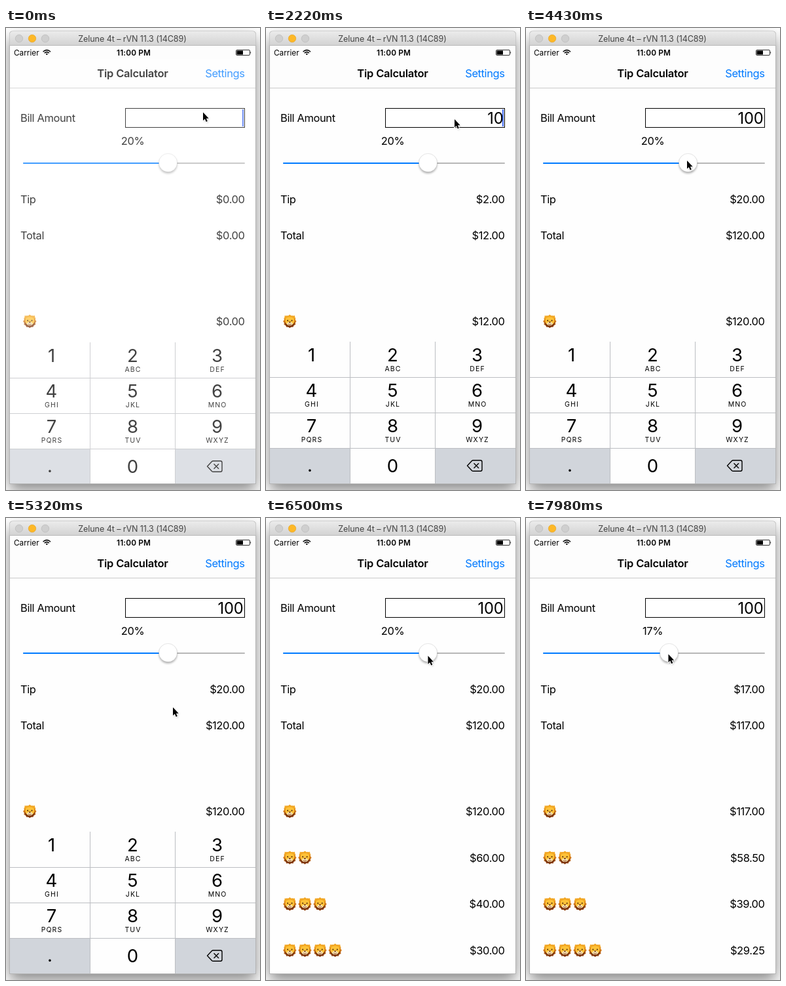
Write an HTML page that moves like this. It is 388 by 704 pixels and loops after 8 s.

```html
<!DOCTYPE html>
<html lang="en">
<head>
<meta charset="utf-8">
<title>Tip Calculator</title>
<style>
  html, body { margin: 0; width: 100%; height: 100%; overflow: hidden; background: #fff; }
  svg { display: block; }
  text { font-family: Inter, "Liberation Sans", sans-serif; font-size: 16.5px; letter-spacing: -.4px; white-space: pre; }
  .end { text-anchor: end; }
  .mid { text-anchor: middle; }
  .bar { font-size: 11.8px; letter-spacing: 0; }
  .digit { font-size: 27.5px; letter-spacing: 0; text-anchor: middle; }
  .sub { font-size: 10.5px; letter-spacing: 1.1px; text-anchor: middle; }
</style>
</head>
<body>
<svg width="388" height="704" viewBox="0 0 388 704">
  <defs>
    <linearGradient id="chrome" x2="0" y2="1">
      <stop stop-color="#ebebeb"/><stop offset="1" stop-color="#d2d2d2"/>
    </linearGradient>
    <linearGradient id="mane" x2="0" y2="1">
      <stop offset=".1" stop-color="#f0a21f"/><stop offset=".5" stop-color="#d47a18"/><stop offset="1" stop-color="#8a3c10"/>
    </linearGradient>
    <filter id="blur" x="-20%" y="-20%" width="140%" height="140%"><feGaussianBlur stdDeviation="11"/></filter>
    <filter id="soft" x="-50%" y="-50%" width="200%" height="200%"><feGaussianBlur stdDeviation="1.8"/></filter>
    <clipPath id="screen"><rect x="6" y="27" width="375" height="667"/></clipPath>
    <g id="lion">
      <path id="fur" fill="url(#mane)"/>
      <path d="M-8.500 -4L-7.500 -9L-3.500 -7.500L0 -9.800L3.500 -7.500L7.500 -9L8.500 -4Z" fill="#f2a724"/>
      <path d="M-6.800 -2Q-6.500 -6.500 0 -6.500Q6.500 -6.500 6.800 -2Q7 4 4 5.500H-4Q-7 4 -6.800 -2Z" fill="#fec238"/>
      <path d="M-7.500 .5Q-6 4.500 -2.500 5H2.500Q6 4.500 7.500 .5Q8 8.500 0 8.800Q-8 8.500 -7.500 .5Z" fill="#7c3510"/>
      <ellipse cy="3.600" rx="4.300" ry="2.600" fill="#ffeab8"/>
      <path d="M-2 .6H2L0 2.800Z" fill="#5c2410"/>
      <path d="M-2.600 4Q0 6 2.600 4" fill="none" stroke="#7a3518" stroke-width=".9"/>
      <circle cx="-3.200" cy="-1.300" r="1" fill="#4a250c"/>
      <circle cx="3.200" cy="-1.300" r="1" fill="#4a250c"/>
    </g>
  </defs>

  <rect x="5" y="15" width="377" height="690" rx="6" opacity=".46" filter="url(#blur)"/>
  <path d="M5 695V10Q5 4.500 10.500 4.500H376.500Q382 4.500 382 10V695Z" fill="#b5b5b5"/>
  <path d="M5.500 27V10.500Q5.500 5 11 5H376Q381.500 5 381.500 10.500V27Z" fill="url(#chrome)"/>
  <rect x="5" y="26" width="377" height="1" fill="#bababa"/>
  <g stroke-width=".7">
    <circle cx="20" cy="16" r="5.700" fill="#cfcfcf" stroke="#b9b9b9"/>
    <circle cx="40" cy="16" r="5.700" fill="#fdb827" stroke="#e5a526"/>
    <circle cx="60" cy="16" r="5.700" fill="#cfcfcf" stroke="#b9b9b9"/>
  </g>
  <text class="mid" x="193" y="20.500" fill="#444" style="font-size:12.600px;letter-spacing:-.1px">Zelune 4t – rVN 11.3 (14C89)</text>

  <g clip-path="url(#screen)">
    <rect x="6" y="27" width="375" height="667" fill="#fefefe"/>
    <rect x="6" y="27" width="375" height="64" fill="#fdfdfd"/>
    <rect x="6" y="91" width="375" height="1" fill="#cacaca"/>
    <text class="bar" x="12" y="41.500">Carrier</text>
    <g fill="none" stroke="#000" stroke-width="1.500">
      <path d="M56.600 36.200Q62.300 31 68 36.200M58.700 38.300Q62.300 35 65.900 38.300"/>
      <path d="M60.600 39.500Q62.300 38 64 39.500L62.300 41.300Z" fill="#000" stroke="none"/>
    </g>
    <text class="bar mid" x="195" y="41.500" font-weight="600" style="letter-spacing:.15px">11:00 PM</text>
    <rect x="351.500" y="33.500" width="21" height="8" rx="1.500" fill="none" stroke="#000" stroke-width=".8"/>
    <rect x="352.500" y="34.500" width="9.500" height="6" fill="#000"/>
    <path d="M373.400 36Q375.200 37.500 373.400 39Z"/>

    <text class="mid" x="193.500" y="75" font-weight="600" style="letter-spacing:-.22px">Tip Calculator</text>
    <text class="end" x="364.600" y="75" fill="#007aff">Settings</text>
    <text x="22" y="143">Bill Amount</text>
    <rect x="182.500" y="122.500" width="182" height="29" fill="#fff" stroke="#000"/>
    <text id="bill" class="end" x="362.500" y="145.500" style="font-size:23.700px;letter-spacing:-.2px"></text>
    <rect id="caret" x="361" y="124" width="2" height="26" fill="#426bf2"/>
    <text id="rate" class="mid" x="193.500" y="177.500"></text>
    <rect x="26" y="205" width="339" height="2" rx="1" fill="#b7b7b7"/>
    <rect id="track" x="26" y="205" height="2" rx="1" fill="#007aff"/>
    <g id="knob">
      <circle cy="2.500" r="14" opacity=".28" filter="url(#soft)"/>
      <circle r="14" fill="#fff" stroke="#000" stroke-opacity=".14" stroke-width=".7"/>
    </g>
    <text x="22" y="267">Tip</text>
    <text x="22" y="321.500">Total</text>
    <text id="tip" class="end" x="364.600" y="267"></text>
    <text id="total" class="end" x="364.600" y="321.500"></text>
    <g id="split"></g>
    <g id="pad"></g>
    <rect id="veil" x="6" y="48" width="375" height="646" fill="#fff"/>
  </g>

  <g id="mouse">
    <path d="M.8 1.500V14.500L3.800 11.800L5.800 16.200L8 15.200L6.200 11H9.600Z" opacity=".25" filter="url(#soft)"/>
    <path d="M0 0V12.600L2.800 10L4.800 14.500L6.800 13.600L4.900 9.200H8.700Z" stroke="#fff" stroke-width="1.800" paint-order="stroke"/>
  </g>
</svg>
<script>
const LOOP = 8000, TICK = 147.9;
const $ = id => document.getElementById(id);
const money = v => '$' + v.toFixed(2);

// Tick at which a value starts to hold
const bills = [[0, 0], [12, 1], [15, 10], [18, 100]];
const blinks = [[0, 1], [2, .5], [3, 0], [5, .5], [6, 1], [9, .5], [10, 0], [12, 1],
  [22, .5], [23, 0], [25, .5], [26, 1], [29, .5], [30, 0], [32, .5], [33, 1], [35, .5], [36, 0]];
const drops = [[0, 1], [1, 0], [38, 209], [39, 220]];

// Tick, x, y
const path = [[0, 301, 128.5], [3, 288, 139], [22, 288, 139], [27, 245, 192], [29, 246, 202],
  [31, 246, 202], [33, 255, 288.5], [38, 255, 288.5], [45, 247, 205.5], [47, 247, 205.5],
  [50, 233, 205], [51, 233, 205], [54, 217.5, 207.5]];
const slide = [[0, 247.5], [47, 247.5], [50, 233], [51, 233], [54, 218.5]];

const hold = (list, k) => list.filter(e => e[0] <= k).pop()[1];

function tween(list, k, col) {
  const i = list.findIndex(e => e[0] > k);
  if (i < 0) return list[list.length - 1][col];
  const a = list[i - 1], b = list[i];
  const u = (k - a[0]) / (b[0] - a[0]);
  return a[col] + (b[col] - a[col]) * u * u * (3 - 2 * u);
}

function buildFur() {
  let d = '';
  for (let i = 0; i < 24; i++) {
    const a = i * Math.PI / 12, r = i % 2 ? 8.8 : 10.2;
    d += (i ? 'L' : 'M') + (r * Math.sin(a)).toFixed(2) + ' ' + (-r * Math.cos(a)).toFixed(2);
  }
  $('fur').setAttribute('d', d + 'Z');
}

function buildSplit() {
  let s = '';
  for (let n = 1; n <= 4; n++) {
    const y = 447 + (n - 1) * 70.6;
    for (let i = 0; i < n; i++) s += `<use href="#lion" x="${36.3 + i * 23.1}" y="${y}"/>`;
    s += `<text class="end share" x="364.6" y="${y + 6}"></text>`;
  }
  $('split').innerHTML = s;
}

function buildPad() {
  const cols = [69.5, 193.5, 322.5];
  const subs = ['', 'ABC', 'DEF', 'GHI', 'JKL', 'MNO', 'PQRS', 'TUV', 'WXYZ'];
  const box = (x, y, w, h, c) => `<rect x="${x}" y="${y}" width="${w}" height="${h}" fill="${c}"/>`;
  let s = box(6, 478, 375, 217, '#fefefe') + box(6, 640, 122, 55, '#d1d5db') + box(259, 640, 122, 55, '#d1d5db');
  for (const y of [532, 586, 640]) s += box(6, y, 375, 1, '#bcbec2');
  for (const x of [128, 258]) s += box(x, 478, 1, 217, '#bcbec2');
  subs.forEach((sub, i) => {
    const x = cols[i % 3], y = 508 + Math.floor(i / 3) * 54;
    s += `<text class="digit" x="${x}" y="${y}">${i + 1}</text><text class="sub" x="${x + .5}" y="${y + 15}">${sub}</text>`;
  });
  s += `<text class="digit" x="193.5" y="677">0</text><text class="digit" x="67" y="676">.</text>
    <path d="M307.500 667L314.500 659.500Q315.300 658.700 316.500 658.700H327.500Q330 658.700 330 661.200V672.800Q330 675.300 327.500 675.300H316.500Q315.300 675.300 314.500 674.500ZM317.500 663.300L325 670.800M325 663.300L317.500 670.800" fill="none" stroke="#000" stroke-width="1.400" stroke-linejoin="round"/>`;
  $('pad').innerHTML = s;
}

function draw(t) {
  const k = Math.floor((t + 9) / TICK);
  const bill = hold(bills, k), x = tween(slide, k, 1);
  const rate = Math.round((x - 40) / 311 * 30);
  const tip = bill * rate / 100, total = bill + tip;

  $('bill').textContent = bill || '';
  $('rate').textContent = rate + '%';
  $('tip').textContent = money(tip);
  $('total').textContent = money(total);
  shares.forEach((el, i) => el.textContent = money(total / (i + 1)));

  $('caret').setAttribute('opacity', hold(blinks, k));
  $('track').setAttribute('width', x - 26);
  $('knob').setAttribute('transform', `translate(${x} 205.3)`);
  $('pad').setAttribute('transform', `translate(0 ${hold(drops, k)})`);
  $('veil').setAttribute('opacity', Math.max(0, .26 - .18 * k));
  $('mouse').setAttribute('transform', `translate(${tween(path, k, 1)} ${tween(path, k, 2)})`);
}

buildFur();
buildSplit();
buildPad();
const shares = [...document.querySelectorAll('.share')];
const start = performance.now();

function loop() {
  draw((performance.now() - start) % LOOP);
  requestAnimationFrame(loop);
}
loop();
</script>
</body>
</html>
```
